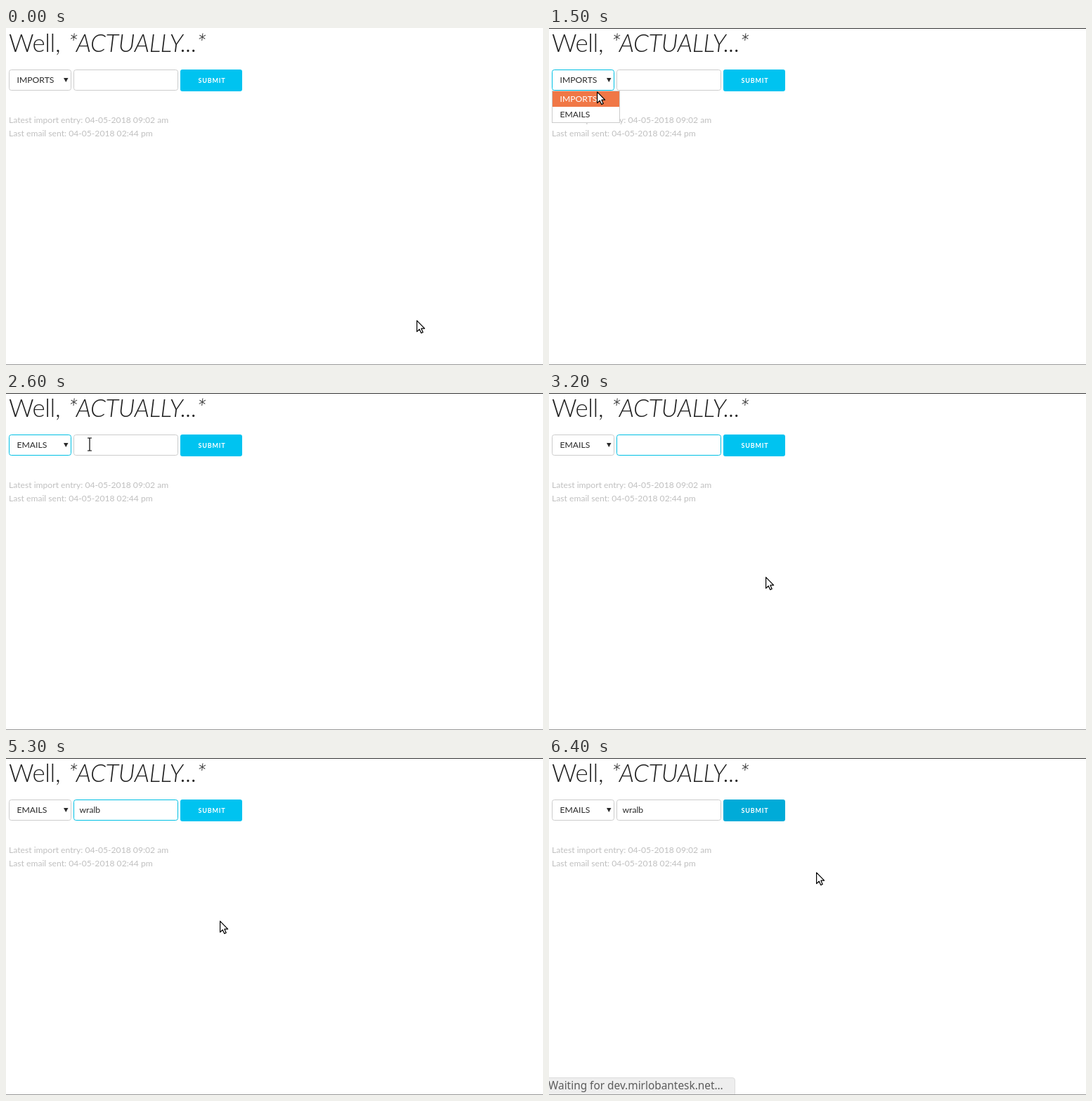
Animation, 764 px wide and 479 px high, one loop 8 s. Source, as an HTML page:

```html
<!DOCTYPE html>
<html lang="en">
<head>
<meta charset="utf-8">
<title>Import lookup</title>
<style>
  html, body { margin: 0; width: 100%; height: 100%; overflow: hidden; background: #fff; }
  svg { display: block; font: 12.2px Lato, sans-serif; fill: #2a2a2a; }
  .title { font-size: 35px; font-weight: 300; letter-spacing: -.4px; fill: #222; }
  .title + .title { font-style: italic; }
  .field { fill: #fff; stroke: #ccc; }
  .field.focus { stroke: #00c0e4; }
  .note { font-size: 12.15px; fill: #c0c0c0; }
  .status { font: 15.4px "Noto Sans", sans-serif; fill: #5c5c5c; }
  .submit { font-size: 9px; font-weight: 700; letter-spacing: .8px; fill: #fff; }
  .cursor { fill: #fff; stroke: #000; stroke-width: 1.2; stroke-linejoin: round; }
</style>
</head>
<body>
<svg width="764" height="479" viewBox="0 0 764 479">
  <text class="title" x="4" y="34">Well,</text>
  <text class="title" x="88.500" y="34">*ACTUALLY...*</text>

  <rect id="select" class="field" x="4.5" y="59.5" width="88" height="29" rx="3"/>
  <text id="choice" x="15.5" y="78"></text>
  <path d="M82 71h6.5l-3.25 6z"/>

  <rect id="input" class="field" x="96.5" y="59.5" width="148" height="29" rx="3"/>
  <text id="typed" x="104.5" y="78"></text>
  <rect id="caret" y="67" width="1" height="14"/>

  <rect id="button" x="248" y="59" width="88" height="31" rx="3"/>
  <text class="submit" x="273.5" y="78">SUBMIT</text>

  <text class="note" x="4" y="135">Latest import entry: 04-05-2018 09:02 am</text>
  <text class="note" x="4" y="154">Last email sent: 04-05-2018 02:44 pm</text>

  <g id="menu">
    <rect x="4.5" y="89.5" width="96" height="45" fill="#fff" stroke="#ccc"/>
    <rect id="highlight" x="5" width="95" height="22" fill="#f07746"/>
    <text id="option0" x="15.5" y="105">IMPORTS</text>
    <text id="option1" x="15.5" y="127">EMAILS</text>
  </g>

  <g id="status">
    <path d="M-1 454.5H261q3.5 0 3.5 3.5V479H-1z" fill="#eee" stroke="#ddd"/>
    <text class="status" x="-1" y="471">Waiting for dev.mirlobantesk.net…</text>
  </g>

  <path d="M0 478.5H764" stroke="#999"/>
  <path id="topLine" d="M0 .5H764" stroke="#333"/>

  <g id="pointer" class="cursor">
    <path id="arrow" d="M.6 .9V16.6L4.2 13.2L6.7 18.6L9.2 17.5L6.9 12.2H11.6z"/>
    <path id="hand" d="M-1.5 9V1.5Q0-.5 1.5 1.5V6Q3 5 4.2 6.5Q5.7 5.5 6.8 7Q8.5 6.5 9.3 8V12L8 15.5H0L-4.5 9.5Q-4.5 7-1.5 9z"/>
    <path id="beam" d="M-3-9H3M0-9V9M-3 9H3" fill="none"/>
  </g>
</svg>
<script>
const LOOP = 8000, STEP = 100;
const el = id => document.getElementById(id);
const show = (id, on) => el(id).style.display = on ? '' : 'none';
const within = (t, from, to) => t >= from && t < to;
const ease = p => p * p * (3 - 2 * p);

// Pointer stops: time, x, y
const stops = [
  [100, 584, 415], [900, 78, 81], [1400, 78, 81], [1700, 40, 114],
  [1900, 40, 114], [2000, 44, 105], [2400, 113, 70], [2500, 113, 70],
  [2700, 125, 76], [2900, 308, 261], [5200, 308, 261], [5600, 285, 70],
  [5700, 285, 70], [6100, 380, 161], [6300, 380, 161], [6400, 380, 162]
];
// Contents of the input: time, text
const typing = [
  [0, ''], [3700, 'w'], [3800, 'wra'], [4000, 'wralb'], [4100, 'wralbg'], [5100, 'wralb']
];

function pointerAt(t) {
  const next = stops.findIndex(s => s[0] > t);
  if (next < 0) return stops.at(-1).slice(1);
  if (next === 0) return stops[0].slice(1);
  const [t0, x0, y0] = stops[next - 1], [t1, x1, y1] = stops[next];
  const p = ease((t - t0) / (t1 - t0));
  return [Math.round(x0 + (x1 - x0) * p), Math.round(y0 + (y1 - y0) * p)];
}

function draw(now) {
  const t = Math.floor(now % LOOP / STEP) * STEP;
  const [x, y] = pointerAt(t);
  const inside = (left, right) => x >= left && x < right && y >= 59 && y < 90;
  const overButton = inside(248, 336), overInput = inside(96, 245);

  el('pointer').setAttribute('transform', `translate(${x} ${y})`);
  show('hand', overButton);
  show('beam', overInput);
  show('arrow', !overButton && !overInput);

  el('select').classList.toggle('focus', within(t, 1200, 2700));
  el('choice').textContent = t < 2100 ? 'IMPORTS' : 'EMAILS';
  const picked = t < 1600 ? 0 : 1;
  show('menu', within(t, 1300, 2000));
  el('highlight').setAttribute('y', 90 + 22 * picked);
  for (const i of [0, 1]) el('option' + i).style.fill = i === picked ? '#fff' : '';

  el('input').classList.toggle('focus', within(t, 2700, 5600));
  el('typed').textContent = typing.findLast(s => s[0] <= t)[1];
  el('caret').setAttribute('x', Math.round(104 + el('typed').getComputedTextLength()));
  show('caret', within(t, 2700, 3200) || within(t, 3700, 4700));

  el('button').style.fill = overButton || t >= 5600 ? '#00abd8' : '#00c3f0';
  show('status', t >= 6200);
  show('topLine', t >= 1200);
}

function frame() {
  draw(performance.now());
  requestAnimationFrame(frame);
}
frame();
</script>
</body>
</html>
```
